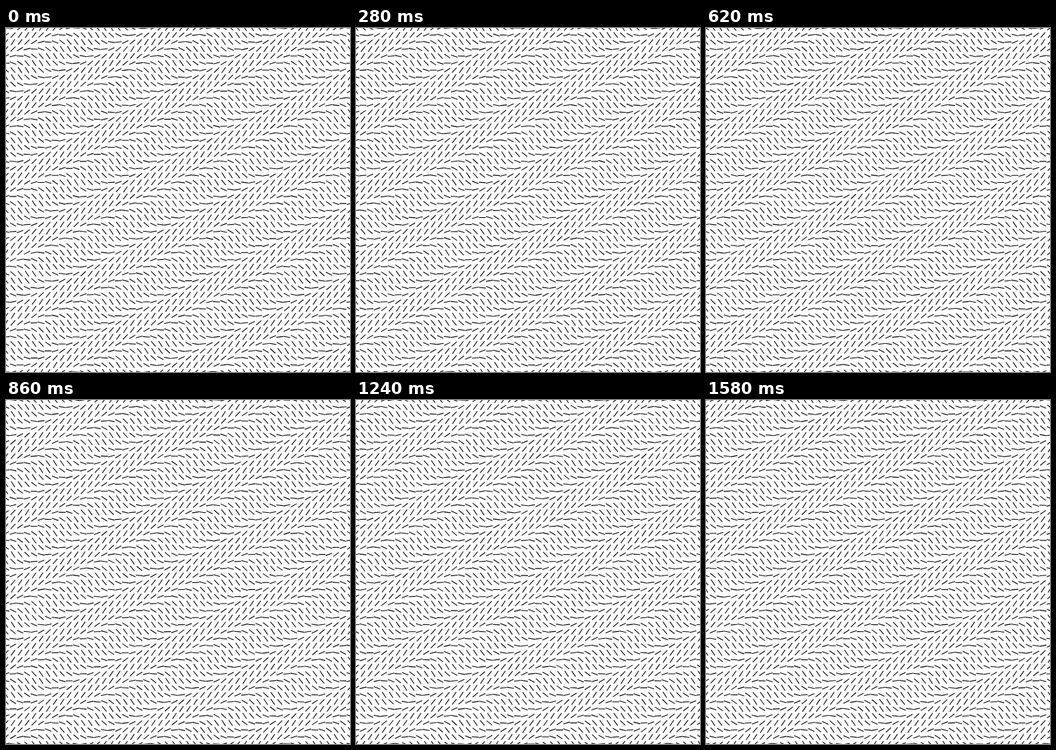
An HTML page with a canvas for the animation above (1600 ms loop, 500x500 px).

```html
<!DOCTYPE html>
<html lang="en">
<head>
<meta charset="utf-8">
<title>Dash field</title>
<style>
  html, body { margin: 0; width: 100%; height: 100%; overflow: hidden; background: #fff; }
  canvas { display: block; width: 500px; height: 500px; }
</style>
</head>
<body>
<canvas id="stage" width="500" height="500"></canvas>
<script>
const ctx = document.getElementById('stage').getContext('2d');
const SIZE = 500, COUNT = 50, LOOP = 1600, STEP = 20;
const GAP = SIZE / (COUNT - 1), HALF = 5, WAVE = 200, TURN = 2 * Math.PI;

function draw(t) {
  ctx.fillStyle = '#fff';
  ctx.fillRect(0, 0, SIZE, SIZE);
  ctx.strokeStyle = '#000';
  ctx.lineWidth = 1.1;
  ctx.beginPath();
  for (let row = 0; row < COUNT; row++) {
    for (let col = 0; col < COUNT; col++) {
      const x = col * GAP, y = row * GAP;
      // a wave travelling right tilts each dash by up to one radian
      const angle = Math.sin(TURN * (t - (x + 2 * y) / WAVE));
      const dx = HALF * Math.cos(angle), dy = HALF * Math.sin(angle);
      ctx.moveTo(x - dx, y - dy);
      ctx.lineTo(x + dx, y + dy);
    }
  }
  ctx.stroke();
}

function tick() {
  const ms = performance.now() % LOOP;
  draw(Math.floor(ms / STEP) * STEP / LOOP);
  requestAnimationFrame(tick);
}
tick();
</script>
</body>
</html>
```
